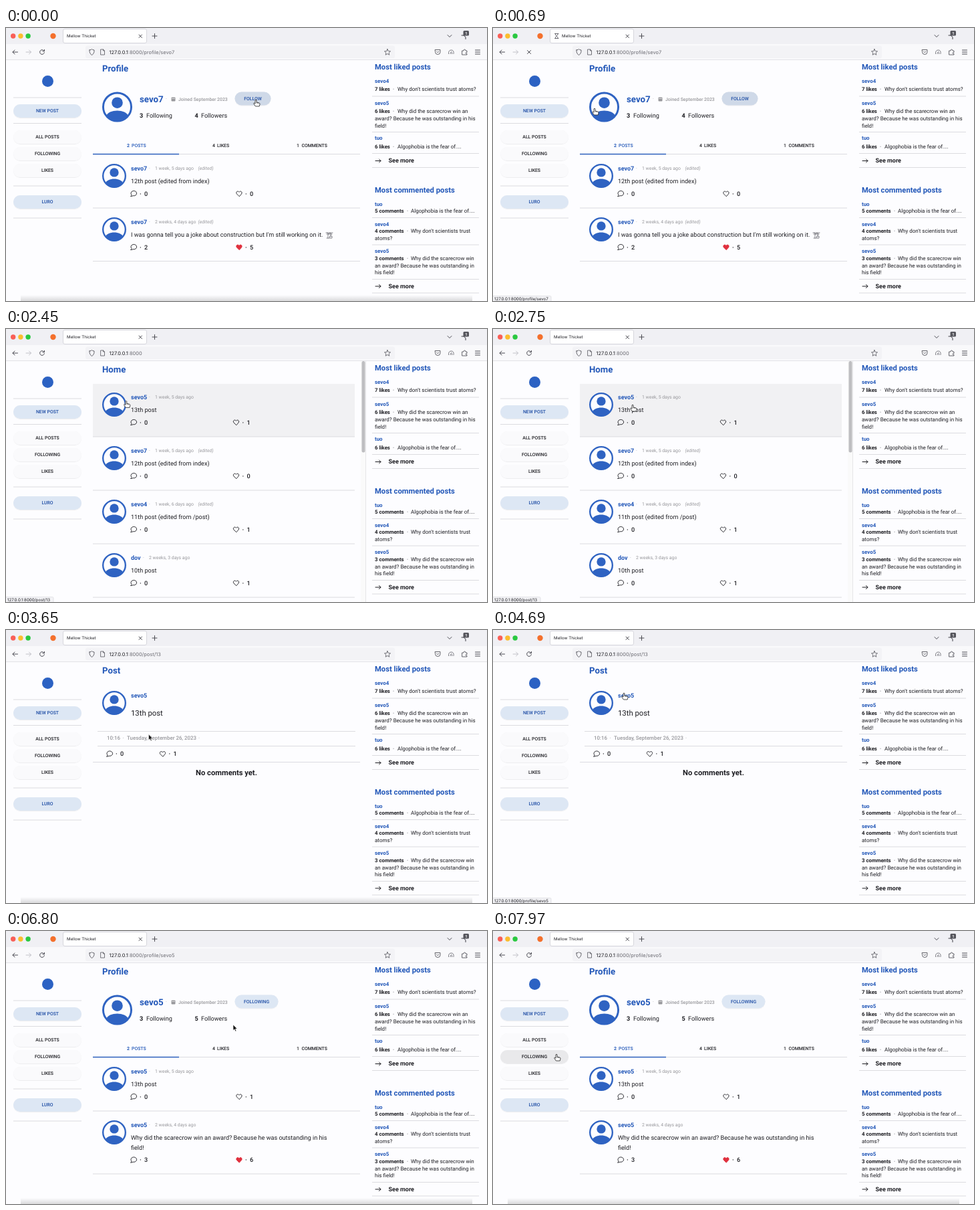
Write an HTML page that moves like this. It is 720 by 408 pixels and loops after 8 s.

```html
<!DOCTYPE html>
<html lang="en">
<head>
<meta charset="utf-8">
<title>Mellow Thicket</title>
<style>
html, body { margin: 0; width: 100%; height: 100%; overflow: hidden; background: #fdfdff; }
svg { display: block; width: 720px; height: 408px; font-family: Roboto, sans-serif; cursor: default; text-rendering: geometricPrecision; }
.ui { font-family: Inter, sans-serif; }
</style>
</head>
<body>
<svg viewBox="0 0 720 408">
  <defs>
    <linearGradient id="fade" x2="0" y2="1"><stop stop-opacity="0"/><stop offset="1" stop-opacity=".14"/></linearGradient>
    <filter id="shade" x="-10%" y="-30%" width="120%" height="170%"><feDropShadow dx="0" dy=".5" stdDeviation=".7" flood-opacity=".12"/></filter>
  </defs>
  <g id="stage"></g>
  <g id="hand" stroke="#222" stroke-width=".8" stroke-linejoin="round" fill="#fff">
    <path d="M-1 .8Q0-.6 1 .8V4L5 5Q6.2 5.4 6 7L5.2 10H-.6L-3.2 6.2Q-3.4 4.8-2.2 5.2L-1 6.2Z"/>
    <path d="M1 4V5.6M2.4 4.4V5.8M3.8 4.8V6" fill="none" stroke-width=".5"/>
  </g>
  <path id="arrow" d="M0 0V8.6L2 6.8L3.4 10L4.8 9.4L3.4 6.3H6Z" fill="#111" stroke="#fff" stroke-width=".6"/>
</svg>
<script>
const INK = '#1e1e23', BLUE = '#2257b8', NAVY = '#1d4ca4', PALE = '#dde7f4', GREY = '#98989c', RULE = '#dcdce0';
const HOST = '127.0.0.1:8000';
const ONE = 'sevo4', TWO = 'sevo7', THREE = 'sevo5', TUO = 'tuo', DOV = 'dov';
const $ = id => document.getElementById(id);

// Text placed by the middle of its capitals
const text = (x, y, str, size, fill = INK, weight = 400, more = '') =>
  `<text x="${x}" y="${y + size * .355}" font-size="${size}" fill="${fill}" font-weight="${weight}" ${more}>${str}</text>`;
const mid = (x, y, str, size, fill, weight) => text(x, y, str, size, fill, weight, 'text-anchor="middle"');
const rect = (x, y, w, h, fill, more = '') => `<rect x="${x}" y="${y}" width="${w}" height="${h}" fill="${fill}" ${more}/>`;
const dot = (x, y, r, fill) => `<circle cx="${x}" cy="${y}" r="${r}" fill="${fill}"/>`;
const rule = (x1, x2, y, color = RULE, w = 1) => rect(x1, y - w / 2, x2 - x1, w, color);
const line = (d, color = '#4a4a52', w = 1, fill = 'none') =>
  `<path d="${d}" fill="${fill}" stroke="${color}" stroke-width="${w}" stroke-linecap="round" stroke-linejoin="round"/>`;
const pill = (x, y, w, h, fill, label, color) =>
  rect(x, y, w, h, fill, `rx="${h / 2}" filter="url(#shade)"`) + mid(x + w / 2, y + h / 2, label, 6.9, color, 500);

const avatar = (x, y, r) => `<g transform="translate(${x} ${y}) scale(${r})" fill="#2f63c2">
  <circle r=".935" fill="#fdfdff" stroke="#2f63c2" stroke-width=".13"/><circle cy="-.28" r=".37"/>
  <path d="M-.74 .62C-.6 .12 .6 .12 .74 .62A.965 .965 0 0 1-.74 .62Z"/></g>`;
const bubble = (x, y) => line(`M${x - 4} ${y + 4}Q${x - 2.8} ${y + 3} ${x - 3} ${y + 2}A4.3 3.7 0 1 1 ${x - .8} ${y + 3.2}Q${x - 2.4} ${y + 4.2} ${x - 4} ${y + 4}Z`, INK, .9);
const heart = (x, y, red) => line(`M${x} ${y + 4}L${x - 3.6} ${y + .4}C${x - 5.6} ${y - 2} ${x - 2.2} ${y - 5.2} ${x} ${y - 2.2}C${x + 2.2} ${y - 5.2} ${x + 5.6} ${y - 2} ${x + 3.6} ${y + .4}Z`,
  red ? '#e0303e' : INK, .9, red ? '#e0303e' : 'none');
const counts = (x, hx, y, talk, likes, red) =>
  bubble(x, y) + text(x + 9, y, '·', 9, INK, 700) + text(x + 16, y, talk, 9.1, INK, 500) +
  heart(hx, y, red) + text(hx + 9, y, '·', 9, INK, 700) + text(hx + 16, y, likes, 9.1, INK, 500);

// One entry of a feed; y is the middle of the name
function post(y, name, when, edited, lines, talk, likes, hx, red) {
  const nx = name.length > 3 ? 214 : 205;
  const last = y + 37.5 + 14.5 * (lines.length - 1);
  return avatar(162, y + 11, 18) + text(187, y, name, 9, BLUE, 700) + text(nx, y, '·', 7, GREY) +
    text(nx + 9, y, when, 6.9, GREY) + (edited ? text(287.5, y, '(edited)', 6.9, GREY, 400, 'font-style="italic"') : '') +
    lines.map((s, i) => text(187, y + 19 + 14.5 * i, s, 9.1)).join('') + counts(191, hx, last, talk, likes, red);
}

const crane = line('M479 306H489M480 308H488M481 306L483 308L485 306L487 308M482 308V314M480 314H484M486 308V311M485 311H488V314H485Z', '#66666c', .8);

const pages = {
  profile({ name, follows }, dark) {
    const joke = name === THREE;
    return text(144, 60, 'Profile', 13.2, BLUE, 700) + avatar(166.5, 118, 22.5) +
      text(200, 106.5, name, 13.3, BLUE, 700) + text(239, 106, '·', 7, GREY) +
      rect(247.5, 103.5, 6, 6, GREY, 'rx="1"') + line('M249 103V102.5M252 103V102.5M248.5 105.5H252.5', '#fff', .6) +
      text(258, 106.5, 'Joined September 2023', 6.9, GREY, 500) +
      pill(342.5, 95.5, follows ? 65 : 54, 20, dark ? '#cfd9e8' : PALE, follows ? 'FOLLOWING' : 'FOLLOW', NAVY) +
      text(200, 130.5, '3', 9.1, INK, 700) + text(210, 130.5, 'Following', 9.1) +
      text(282.5, 130.5, follows ? 5 : 4, 9.1, INK, 700) + text(292, 130.5, 'Followers', 9.1) +
      mid(183, 175.5, '2', 6.9, BLUE, 700) + text(188, 175.5, 'POSTS', 6.9, BLUE, 500) +
      text(309, 175.5, '4', 6.9, INK, 500) + text(316, 175.5, 'LIKES', 6.9, INK, 500) +
      text(435, 175.5, '1', 6.9, INK, 500) + text(442.5, 175.5, 'COMMENTS', 6.9, INK, 500) +
      rule(130, 530, 188.5) + rule(130, 259, 188.5, BLUE, 1.4) + rule(130, 530, 269) +
      (joke
        ? post(210, name, '1 week, 5 days ago', 0, ['13th post'], 0, 1, 349) +
          post(290, name, '2 weeks, 4 days ago', 0, ['Why did the scarecrow win an award? Because he was outstanding in his', 'field!'], 3, 6, 349, 1)
        : post(210, name, '1 week, 5 days ago', 1, ['12th post (edited from index)'], 0, 0, 349) +
          post(290, name, '2 weeks, 4 days ago', 1, ["I was gonna tell you a joke about construction but I'm still working on it."], 2, 5, 349, 1) + crane) +
      rule(130, 530, joke ? 363 : 348.5);
  },
  home(_, dark) {
    const rows = [
      [THREE, '1 week, 5 days ago', 0, ['13th post'], 0, 1],
      [TWO, '1 week, 5 days ago', 1, ['12th post (edited from index)'], 0, 0],
      [ONE, '1 week, 6 days ago', 1, ['11th post (edited from /post)'], 0, 1],
      [DOV, '2 weeks, 3 days ago', 0, ['10th post'], 0, 1]];
    return text(144, 60, 'Home', 13.2, BLUE, 700) + (dark ? rect(130, 82, 392, 79, '#f1f1f3') : '') +
      rows.map((r, i) => post(102 + 80 * i, ...r, 344.5) + rule(130, 522, 161 + 80 * i)).join('') +
      rect(531, 48, 8, 360, '#fafafa') + rule(538, 539, 228, '#e6e6e8', 360) + rect(532.5, 48, 5, 136.5, '#bebec1', 'rx="2.5"');
  },
  post: () => text(144, 60, 'Post', 13.2, BLUE, 700) + avatar(162, 109, 18) + text(187, 98, THREE, 9, BLUE, 700) +
    text(187, 124, '13th post', 11.3) + rule(137, 523, 151.5) +
    text(151, 161.5, '10:16', 7.9, GREY, 500) + text(174.5, 161.5, '·', 7.9, GREY) +
    text(181, 161.5, 'Tuesday, September 26, 2023', 7.9, GREY, 500) + text(288, 161.5, '·', 7.9, GREY) +
    rule(137, 523, 173.5) + counts(155, 234.5, 185, 0, 1) + rule(130, 530, 197.5) +
    mid(330, 213.5, 'No comments yet.', 11.2, INK, 700)
};

// Ranked list at the right: name, tally, lines, middle of the name, rule below
function ranking(y, title, gap, items, end) {
  return text(552, y, title, 11.25, BLUE, 700) + items.map(([name, tally, lines, top, low]) => {
    const long = tally.length > 8;
    return text(552, top, name, 7.9, BLUE, 700) + text(552, top + gap, tally, 7.8, INK, 700) +
      text(long ? 600 : 579, top + gap, '·', 8) +
      lines.map((s, i) => text(i ? 552 : long ? 606 : 586, top + gap + 10.8 * i, s, 8)).join('') + rule(548, 708, low);
  }).join('') + line(`M553 ${end}H561M558.5 ${end - 2.5}L561 ${end}L558.5 ${end + 2.5}`, INK, 1) +
    text(572.5, end - .5, 'See more', 9, INK, 700) + rule(548, 708, end + 10);
}
const scarecrow = ['Why did the scarecrow win an', 'award? Because he was outstanding in his', 'field!'];
const scarecrow2 = ['Why did the scarecrow win', 'an award? Because he was outstanding in', 'his field!'];
const fear = ['Algophobia is the fear of....'];
const aside = ranking(58.5, 'Most liked posts', 12.5, [
  [ONE, '7 likes', ["Why don't scientists trust atoms?"], 79, 102],
  [THREE, '6 likes', scarecrow, 112, 155.5],
  [TUO, '6 likes', fear, 164.5, 187.5]], 198.5) +
  ranking(242.5, 'Most commented posts', 10.5, [
  [TUO, '5 comments', fear, 263, 283.5],
  [ONE, '4 comments', ["Why don't scientists trust", 'atoms?'], 293, 324],
  [THREE, '3 comments', scarecrow2, 333.5, 375.5]], 386);

const menu = [['NEW POST', 114, PALE, NAVY], ['ALL POSTS', 153, '#fafafc', INK], ['FOLLOWING', 178, '#fafafc', INK],
  ['LIKES', 203, '#fafafc', INK], ['LURO', 250, PALE, NAVY]];
const sidebar = hit => dot(62.5, 79.5, 8.5, '#2c62c3') + [104, 142.5, 236, 284].map(y => rule(11, 113, y)).join('') +
  menu.map(([label, y, fill, color]) =>
    pill(11, y, 102, 20, hit && hit[1] === y ? '#e9e9eb' : fill, label, color)).join('');

const ui = (...a) => `<g class="ui">${text(...a)}</g>`;
const chrome = rect(0, 0, 720, 24, '#f0f0f4') + rect(0, 24, 720, 23.5, '#f9f9fb') + rule(0, 720, 47.5, '#dedee2', .8) +
  ['#f95f57', '#fbbd2e', '#29c840'].map((c, i) => dot(10.7 + 11.2 * i, 12, 3.7, c)).join('') + dot(70.5, 12, 4.2, '#f4702c') +
  rect(85.5, 1.5, 125, 21, '#fff', 'rx="2.5" stroke="#cfcfd6" stroke-width=".8"') +
  line('M199 10L203.5 14.5M203.5 10L199 14.5M222.5 8.5V15.5M219 12H226M661 10.5L664 13.5L667 10.5', '#3a3a42', .9) +
  rect(684.5, 4, 8.5, 7.5, '#55555c', 'rx="1.5"') + `<g class="ui">${mid(688.7, 7.8, '1', 5.5, '#fff', 700)}</g>` +
  line('M682 11H685L688 13.5V16.5', '#3a3a42', 1) +
  rect(119, 26.5, 463, 18.5, '#f3f3f6', 'rx="2.5"') +
  line('M10 36H17.5M13 33L10 36L13 39') + line('M30 36H37.5M34.5 33L37.5 36L34.5 39', '#c2c2c8') +
  line('M125 33Q128.5 32.5 128.5 31.5Q128.5 32.5 132 33Q132.5 38 128.5 40.5Q124.5 38 125 33Z', '#55555c', .9) +
  line('M142 32H145.5L147.5 34V40H142ZM145.5 32V34H147.5', '#55555c', .8) +
  line('M571 31.5L572.3 34.5L575.5 34.8L573.1 37L573.8 40.2L571 38.5L568.2 40.2L568.9 37L566.5 34.8L569.7 34.5Z', '#55555c', .8) +
  line('M642.5 32.5H650V36Q650 39.5 646.2 39.5Q642.5 39.5 642.5 36ZM644.5 35L646.2 36.7L648 35', '#55555c', .9) +
  line('M662.5 38.5Q662 33 666.5 33Q671 33 670 38.5M665 38.5Q665 35.5 667 35.5M667.5 38.5V37', '#77777e', 1) +
  line('M683 34H685Q685 32 686.5 32Q688 32 688 34H690V36.5Q688 36.5 688 37.5Q688 38.5 690 38.5V40H683Z', '#55555c', .9) +
  line('M702.5 33H709.5M702.5 36H709.5M702.5 39H709.5');

const tab = loading => loading
  ? line('M92.5 8.5H98M92.5 15.5H98M93.3 8.5Q93.3 11 95.2 12Q93.3 13 93.3 15.5M97.2 8.5Q97.2 11 95.2 12Q97.2 13 97.2 15.5', '#4a4a52', .8) +
    ui(103, 12.3, 'Mellow Thicket', 6.1) + line('M51.5 33.5L56.5 38.5M56.5 33.5L51.5 38.5')
  : ui(91, 12.3, 'Mellow Thicket', 6.1) + line('M57 34.3A3.4 3.4 0 1 0 57.4 36.6M57.5 32.3V34.7H55');

const address = path => ui(154.5, 36, `127.0.0.1<tspan fill="#6c6c73">:8000${path}</tspan>`, 7.45);
const status = s => s
  ? rect(-1, 400.5, s.length > 23 ? 88 : s.length > 14 ? 72 : 48, 9, '#f3f3f6', 'rx="1.5" stroke="#d6d6db" stroke-width=".6"') + ui(2, 405, s, 6.15)
  : rect(22, 399, 676, 9, 'url(#fade)');

// Start time, page, path, loading and what else the page shows
const two = '/profile/' + TWO, three = '/profile/' + THREE;
const scenes = [
  [0, 'profile', two, 0, { name: TWO }],
  [50, 'profile', two, 1, { name: TWO, held: 1 }],
  [900, 'profile', two, 0, { name: TWO, follows: 1 }],
  [1700, 'profile', two, 1, { name: TWO, follows: 1, note: HOST }],
  [2050, 'home', '', 0, {}],
  [3090, 'home', '', 1, {}],
  [3450, 'post', '/post/13', 0, {}],
  [4830, 'post', '/post/13', 1, { note: HOST + three }],
  [4990, 'profile', three, 0, { name: THREE }],
  [6030, 'profile', three, 1, { name: THREE, held: 1 }],
  [6740, 'profile', three, 0, { name: THREE, follows: 1 }]];

// Pointer tip: time, x, y
const path = [[0, 374, 107], [50, 374, 107], [690, 152, 120], [850, 150, 119], [1200, 150, 119], [1700, 72, 80], [1970, 129, 97],
  [2030, 131, 98], [2750, 209, 113], [2850, 209, 113], [2930, 201, 107], [3090, 201, 107], [3730, 214, 158], [3970, 214, 158],
  [4690, 196, 94], [4830, 196, 94], [5630, 376, 104], [5760, 382, 103], [6030, 382, 103], [6800, 340, 140],
  [6880, 340, 140], [7680, 316, 181], [7970, 95, 184], [8000, 95, 184]];

function pointer(t) {
  const i = path.findIndex(p => p[0] > t);
  const [t0, x0, y0] = path[i - 1], [t1, x1, y1] = path[i];
  const k = (t - t0) / (t1 - t0), e = k * k * (3 - 2 * k);
  return [x0 + (x1 - x0) * e, y0 + (y1 - y0) * e];
}

// Clickable areas: x, y, width, height, link
const common = [[29, 70, 67, 20, HOST], ...menu.map(m => [11, m[1], 102, 20])];
const links = {
  profile: o => [[342, 95, o.follows ? 65 : 54, 21], [144, 95, 45, 45, HOST + '/profile/' + o.name]],
  home: () => [[130, 82, 392, 79, HOST + '/post/13']],
  post: () => [[187, 93, 23, 10, HOST + three]]
};

let shown;
function draw() {
  const t = performance.now() % 8000;
  const [x, y] = pointer(t);
  const [, page, url, loading, info] = scenes.findLast(s => s[0] <= t);
  const own = links[page](info);
  const hit = [...own, ...common].find(([a, b, w, h]) => x >= a && x < a + w && y >= b && y < b + h);
  const html = rect(0, 0, 720, 408, '#fdfdff') + sidebar(hit) + pages[page](info, info.held || hit === own[0]) + aside +
    status((hit && hit[4]) || info.note) + chrome + tab(loading) + address(url);
  if (html !== shown) $('stage').innerHTML = shown = html;
  for (const id of ['hand', 'arrow']) {
    $(id).setAttribute('transform', `translate(${x} ${y})`);
    $(id).style.display = (id === 'hand') === !!hit ? '' : 'none';
  }
  requestAnimationFrame(draw);
}
draw();
</script>
</body>
</html>
```
